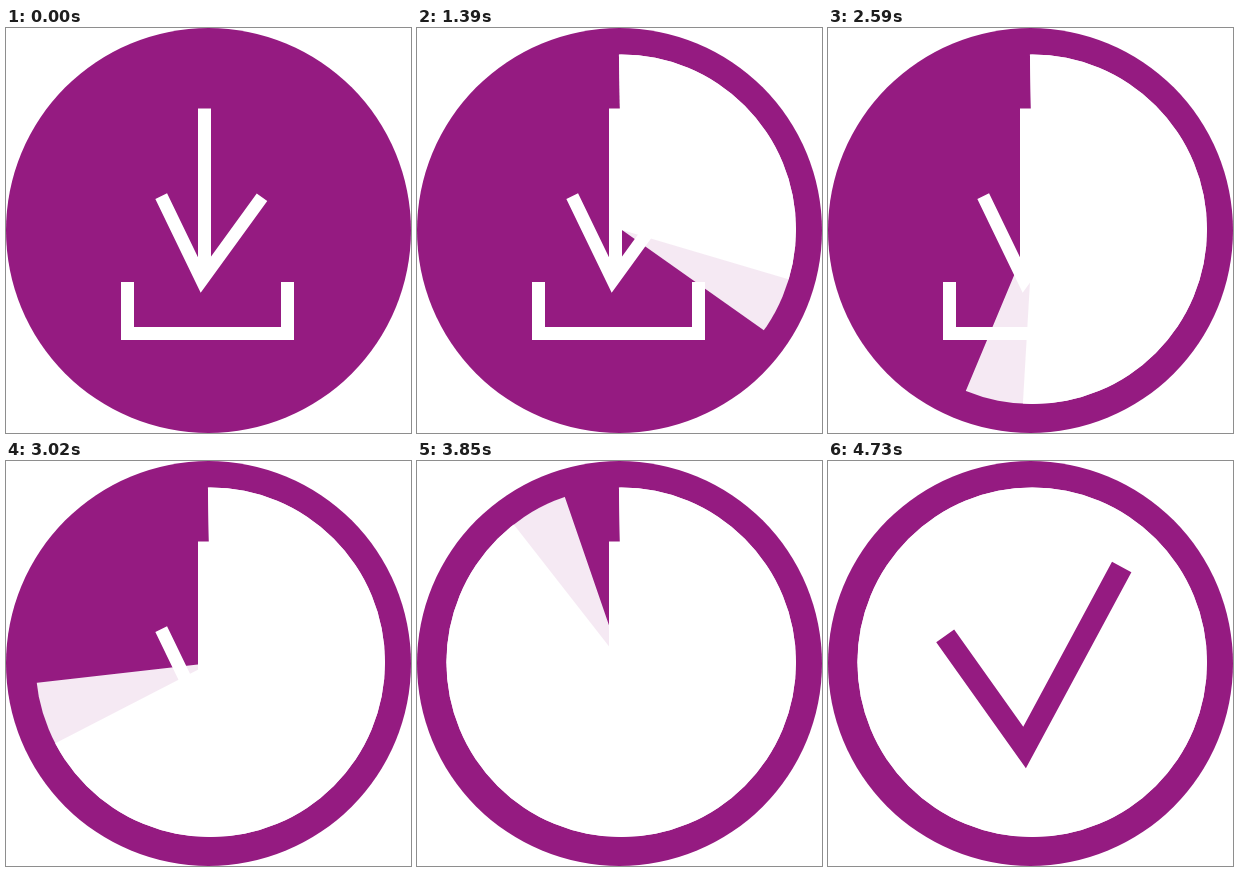
Animation, 405 px wide and 405 px high, one loop 4.83 s. Source, as an HTML page with a canvas:

```html
<!DOCTYPE html>
<html>
<head>
<meta charset="utf-8">
<style>
html, body { margin: 0; height: 100%; overflow: hidden; background: #fff; }
canvas { display: block; }
</style>
</head>
<body>
<canvas id="stage" width="405" height="405"></canvas>
<script>
const LOOP = 4830, PURPLE = '#951b81';
// The dial ticks in bursts [start ms, ticks], each burst with the same repeating beat
const BURSTS = [[300, 3], [930, 1], [1060, 5], [2260, 13]];
const BEAT = [0, 130, 330, 430], BAR = 630;
// Key points [tick, degrees]; ticks in between are spaced evenly
const KEYS = [[0, -1], [3, 62.6], [6, 106.5], [8, 144], [10, 164], [13, 222], [17, 305], [19, 322], [21, 360]];

const ticks = BURSTS.flatMap(([start, count]) =>
  Array.from({ length: count }, (_, k) => start + BAR * Math.floor(k / 4) + BEAT[k % 4]));

const ctx = document.getElementById('stage').getContext('2d');
const disc = new Path2D();
disc.arc(204.2, 201.3, 174.8, 0, 2 * Math.PI);
const arrow = new Path2D('M198.5 80.5V240M155.2 168.2L195.8 252.2L256 169.2M121.5 254V305.5H281.5V254');
const check = new Path2D('M117.2 174.8L196.6 286.5L293.7 106');

function stroke(path, color, width) {
  ctx.strokeStyle = color;
  ctx.lineWidth = width;
  ctx.stroke(path);
}

function angleAt(tick) {
  const i = KEYS.findIndex(key => key[0] >= tick);
  if (i < 0) return 360;
  if (i === 0) return KEYS[0][1];
  const [t0, a0] = KEYS[i - 1], [t1, a1] = KEYS[i];
  return a0 + (a1 - a0) * (tick - t0) / (t1 - t0);
}

function sector(end, color) {
  const rad = a => (a - 90) * Math.PI / 180;
  ctx.fillStyle = color;
  ctx.beginPath();
  ctx.moveTo(205, 202);
  ctx.arc(205, 202, 300, rad(angleAt(0)), rad(end));
  ctx.fill();
}

// The newest sector is pale and turns solid on the next tick
function dial(t) {
  const tick = ticks.filter(start => start <= t).length;
  if (!tick) return;
  ctx.save();
  ctx.clip(disc);
  sector(angleAt(tick), 'rgba(255,255,255,.9)');
  sector(angleAt(tick - 1), '#fff');
  ctx.restore();
}

function draw(t) {
  ctx.clearRect(0, 0, 405, 405);
  ctx.fillStyle = PURPLE;
  ctx.beginPath();
  ctx.arc(202.5, 202.5, 202.5, 0, 2 * Math.PI);
  ctx.fill();
  stroke(arrow, '#fff', 13);
  dial(t);
  if (t >= 4280) {
    // The check fades in by steps
    ctx.globalAlpha = Math.min(1, Math.floor((t - 4205) / 75) / 7);
    stroke(check, PURPLE, 22);
    ctx.globalAlpha = 1;
  }
}

function frame() {
  draw(performance.now() % LOOP);
  requestAnimationFrame(frame);
}
frame();
</script>
</body>
</html>
```
